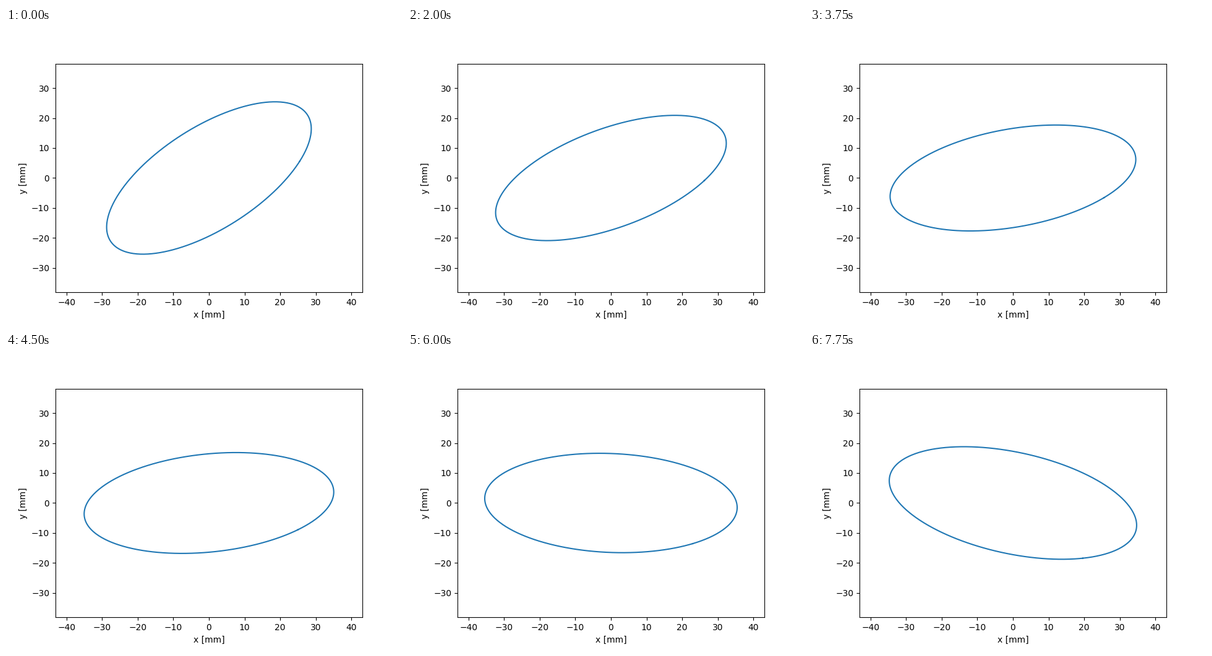
A matplotlib script that plays this animation: 640x480 px, repeating every 8 s.

```python
import numpy as np
import matplotlib.pyplot as plt
from matplotlib.animation import FuncAnimation

FRAMES = 32
INTERVAL = 250  # ms
START = np.radians(-48.2)  # phase where each orbit begins and ends

plt.rcParams["font.family"] = "DejaVu Sans"

phase = START + np.linspace(0, 2 * np.pi, 400)


def orbit(n):
    """Precessing ellipse whose axes slowly grow."""
    major = 34.86 + 0.0156 * n + 0.00042 * n**2
    minor = 16.0 + 0.008 * n + 0.00052 * n**2
    tilt = np.radians(39.62 - 1.781 * n)
    u, v = major * np.cos(phase), minor * np.sin(phase)
    x = u * np.cos(tilt) - v * np.sin(tilt)
    y = u * np.sin(tilt) + v * np.cos(tilt)
    return x, y


fig, ax = plt.subplots(figsize=(6.4, 4.8), dpi=100)
ax.set_xlim(-43.08, 43.08)
ax.set_ylim(-38.15, 38.15)
ax.set_xlabel("x [mm]")
ax.set_ylabel("y [mm]")
line, = ax.plot(*orbit(0), color="#1f77b4", lw=1.5)


def update(n):
    line.set_data(*orbit(n))
    return line,


anim = FuncAnimation(fig, update, frames=FRAMES, interval=INTERVAL,
                     repeat=True, repeat_delay=0)
plt.show()
```
